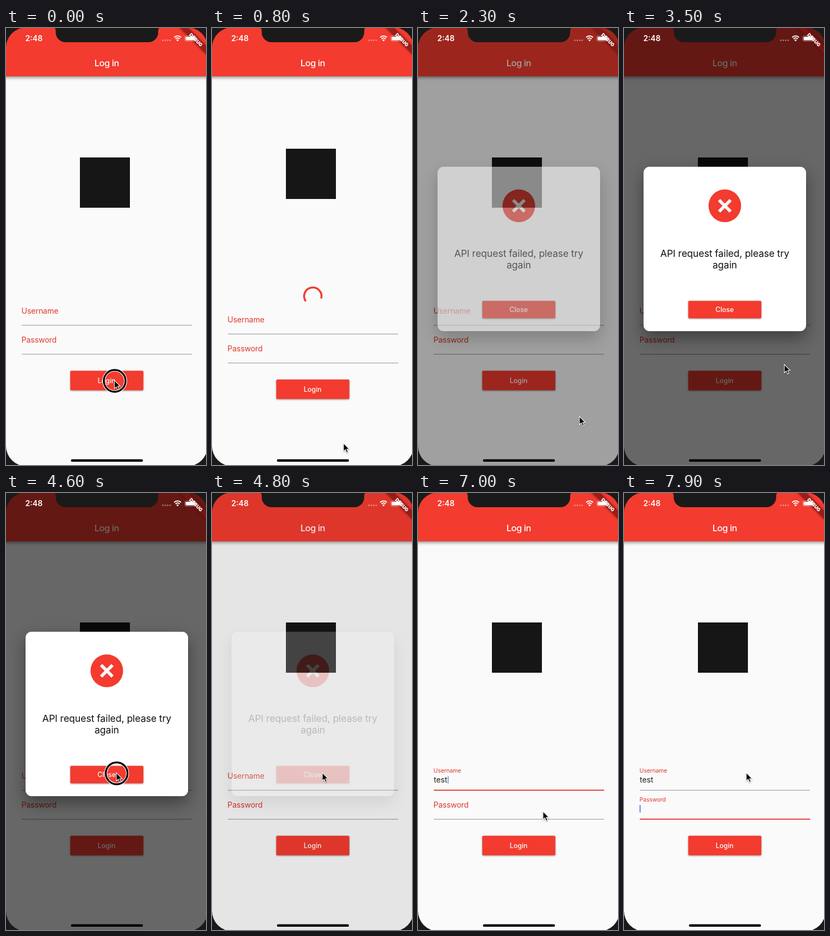
An HTML page for the animation above (8000 ms loop, 368 by 800 pixels).

```html
<!DOCTYPE html>
<html lang="en">
<head>
<meta charset="utf-8">
<title>Log in</title>
<style>
  html, body { margin: 0; width: 100%; height: 100%; overflow: hidden; background: #1b1a1a; }
  svg { display: block; width: 368px; height: 800px; font-family: Inter, Roboto, sans-serif; }
  .red { fill: #f33b2f; }
  .mid { text-anchor: middle; fill: #fff; }
  .label { font-size: 14.2px; letter-spacing: -.15px; fill: #e0382d; }
  .btn { filter: drop-shadow(0 1.5px 1.5px #0006); }
  .btnText { font-size: 12.4px; font-weight: 500; }
  .bar { filter: drop-shadow(0 2px 3px #0007); }
  .panel { filter: drop-shadow(0 13px 15px #0006); }
  .msg { font-size: 17.7px; letter-spacing: -.1px; fill: #111; }
</style>
</head>
<body>
<svg viewBox="0 0 368 800">
  <rect width="368" height="800" fill="#fafafa"/>
  <rect id="logo" x="136" y="237" width="92" height="92" fill="#161616"/>
  <path id="spinner" fill="none" stroke="#f33b2f" stroke-width="3.6" stroke-linecap="square"/>
  <g id="form">
    <g id="user">
      <text class="label">Username</text>
      <path d="M29 544.2H342.5" stroke="#8e8e8e"/>
      <path class="line" d="M29 544.2H342.5" stroke="#e0352b" stroke-width="1.8"/>
      <text class="value" x="29" y="530" font-size="14.2" fill="#222"></text>
      <rect class="caret" y="518" width="2" height="14" rx="1" fill="#4479e0"/>
    </g>
    <g id="pass" transform="translate(0 53)">
      <text class="label">Password</text>
      <path d="M29 544.2H342.5" stroke="#8e8e8e"/>
      <path class="line" d="M29 544.2H342.5" stroke="#e0352b" stroke-width="1.8"/>
      <text class="value" x="29" y="530" font-size="14.2"></text>
      <rect class="caret" y="518" width="2" height="14" rx="1" fill="#4479e0"/>
    </g>
    <rect class="red btn" x="118.3" y="627.4" width="134.4" height="35.8" rx="1.8"/>
    <text class="mid btnText" x="185.2" y="649.7">Login</text>
  </g>
  <rect class="red bar" x="-5" y="-5" width="380" height="93.5"/>
  <text class="mid" x="185.3" y="69.5" font-size="16.5" font-weight="500" letter-spacing="-.45">Log in</text>

  <rect id="barrier" width="368" height="800"/>
  <g id="dialog">
    <rect class="panel" x="36" y="254" width="299" height="301" rx="11" fill="#fff"/>
    <circle class="red" cx="185.5" cy="325.5" r="30"/>
    <path d="M175 315l21 21m0-21l-21 21" stroke="#fff" stroke-width="6"/>
    <text class="mid msg" x="185.5" y="419">API request failed, please try</text>
    <text class="mid msg" x="185.5" y="440.3">again</text>
    <rect class="red btn" x="118.3" y="499.5" width="134.4" height="32" rx="1.8"/>
    <text class="mid btnText" x="185.2" y="520.2">Close</text>
  </g>

  <!-- system chrome -->
  <g transform="translate(349.5 21.5) rotate(45)">
    <rect x="-50" y="-5.4" width="100" height="10.8" fill="#7d1512" opacity=".75" style="filter:drop-shadow(0 0 2px #0008)"/>
    <text class="mid" y="3.2" font-size="8.8" font-weight="900">DEBUG</text>
  </g>
  <g fill="#fff">
    <text x="35.5" y="24.2" font-size="14.2" font-weight="600">2:48</text>
    <path d="M288.5 22.5h15" stroke="#fff" stroke-width="3" stroke-linecap="round" stroke-dasharray="0 4.5" opacity=".4"/>
    <path d="M309.5 17.2a8.6 8.6 0 0 1 12.4 0M311.9 20a5.2 5.2 0 0 1 7.6 0" fill="none" stroke="#fff" stroke-width="2"/>
    <path d="M315.7 24.6l-2.3-2.5a3.2 3.2 0 0 1 4.6 0z"/>
    <rect x="329" y="14.5" width="20" height="9.5" rx="2.6" fill="none" stroke="#fff" stroke-opacity=".45"/>
    <rect x="330.5" y="16" width="17" height="6.5" rx="1.5"/>
    <path d="M350.5 17.5q1.6 1.7 0 3.5z" opacity=".5"/>
  </g>
  <path fill="#1b1a1a" fill-rule="evenodd" d="M-5-5H380V810H-5zM37-1H334a37 37 0 0 1 37 37V765a37 37 0 0 1-37 37H37A37 37 0 0 1 0 765V36A37 37 0 0 1 37-1z"/>
  <path fill="#1b1a1a" d="M86-1q5.5 0 5.5 6v3a18 18 0 0 0 18 18H262a18 18 0 0 0 18-18v-3q0-6 5.5-6z"/>
  <rect x="119.5" y="789.6" width="132.5" height="4.5" rx="2.25"/>

  <g id="pointer">
    <g id="ring" fill="none" transform="translate(.6 1.2)">
      <circle r="20" stroke="#fff" stroke-width="5.6"/>
      <circle r="20" stroke="#000" stroke-width="3.4"/>
    </g>
    <path d="M0 0V15.2L3.5 12L6 17.6L8.5 16.5L6.1 11H10.8z" stroke="#fff" stroke-width="1.1" style="filter:drop-shadow(0 1px 1px #0005)"/>
  </g>
</svg>
<script>
const LOOP = 8000;
const LOAD = [50, 2230], FADE_IN = 2248, FADE_OUT = 4670, FADE = 150;
const USER_FOCUS = 5450, PASS_FOCUS = 7450;
const CLICKS = [[0, 120], [4480, 4680], [5370, 5530], [7370, 7530]];
const KEYS = [6350, 6500, 6700, 6850];
// time, x, y of the pointer
const PATH = [
  [0, 199.4, 644.8], [150, 199.4, 644.8], [700, 242, 760], [1300, 242, 760], [1700, 297, 711],
  [2900, 297, 711], [3300, 295, 616], [3900, 295, 616], [4350, 203, 512], [4900, 203, 512],
  [5250, 240, 519], [5900, 240, 519], [6300, 236, 557], [6700, 230, 588], [7200, 230, 580],
  [7500, 230, 580], [7850, 225, 512], [LOOP, 225, 512]
];

const $ = id => document.getElementById(id);
const set = (el, attrs) => { for (const k in attrs) el.setAttribute(k, attrs[k]); };
const clamp = v => Math.min(1, Math.max(0, v));
const within = (t, [a, b]) => t >= a && t < b;

function bezier(x1, y1, x2, y2) {
  const at = (a, b, s) => 3 * a * s * (1 - s) ** 2 + 3 * b * s * s * (1 - s) + s ** 3;
  return x => {
    let lo = 0, hi = 1;
    for (let i = 0; i < 20; i++) {
      const m = (lo + hi) / 2;
      if (at(x1, x2, m) < x) lo = m; else hi = m;
    }
    return at(y1, y2, lo);
  };
}
const fastOutSlowIn = bezier(.4, 0, .2, 1);
const ease = bezier(.25, .1, .25, 1);
const easeOut = bezier(0, 0, .58, 1);

function pointerAt(t) {
  const i = PATH.findIndex(p => p[0] > t);
  const [t0, x0, y0] = PATH[i - 1], [t1, x1, y1] = PATH[i];
  const u = (t - t0) / (t1 - t0), e = u * u * (3 - 2 * u);
  return [x0 + (x1 - x0) * e, y0 + (y1 - y0) * e];
}

function spinnerArc(ms) {
  const phase = ms / 1333 % 1;
  const head = fastOutSlowIn(clamp(phase * 2)), tail = fastOutSlowIn(clamp(phase * 2 - 1));
  const start = Math.PI * (-.5 + tail * 1.5 + ms / 2222 * 2 + phase * .5);
  const sweep = Math.max((head - tail) * 1.5 * Math.PI, .02);
  const point = a => `${185.5 + 16 * Math.cos(a)} ${491 + 16 * Math.sin(a)}`;
  return `M${point(start)}A16 16 0 ${+(sweep > Math.PI)} 1 ${point(start + sweep)}`;
}

function drawField(id, t, focus, blur, text) {
  const [label, , line, value, caret] = $(id).children;
  const p = clamp((t - focus) / 200), e = fastOutSlowIn(p);
  set(label, { transform: `translate(28.6 ${522.8 - 10.5 * e}) scale(${1 - .25 * e})` });
  set(line, { opacity: p * (1 - clamp((t - blur) / 200)) });
  value.textContent = text;
  const width = text ? value.getComputedTextLength() + 1 : 0;
  const beat = (t - focus) % 1000;
  const glow = beat < 500 ? 1 - clamp((beat - 400) / 100) * .2 : 1 - clamp((beat - 500) / 150) + clamp((beat - 900) / 100);
  set(caret, { x: 28.6 + width, opacity: within(t, [focus, blur]) ? clamp(glow) : 0 });
}

function draw(t) {
  const loading = within(t, LOAD), shift = loading ? 16 : 0;
  set($('logo'), { transform: `translate(0 ${-shift})` });
  set($('form'), { transform: `translate(0 ${shift})` });
  set($('spinner'), { d: loading ? spinnerArc(t + 20) : '' });

  const typed = 'test'.slice(0, KEYS.filter(k => k <= t).length);
  drawField('user', t, USER_FOCUS, PASS_FOCUS, typed);
  drawField('pass', t, PASS_FOCUS, Infinity, '');

  const shown = clamp(t < FADE_OUT ? (t - FADE_IN) / FADE : 1 - (t - FADE_OUT) / FADE);
  set($('barrier'), { opacity: .59 * ease(shown) });
  set($('dialog'), { opacity: easeOut(shown) });

  set($('pointer'), { transform: `translate(${pointerAt(t)})` });
  set($('ring'), { opacity: +CLICKS.some(c => within(t, c)) });
}

const begin = performance.now();
function tick() {
  draw((performance.now() - begin) % LOOP);
  requestAnimationFrame(tick);
}
tick();
</script>
</body>
</html>
```
